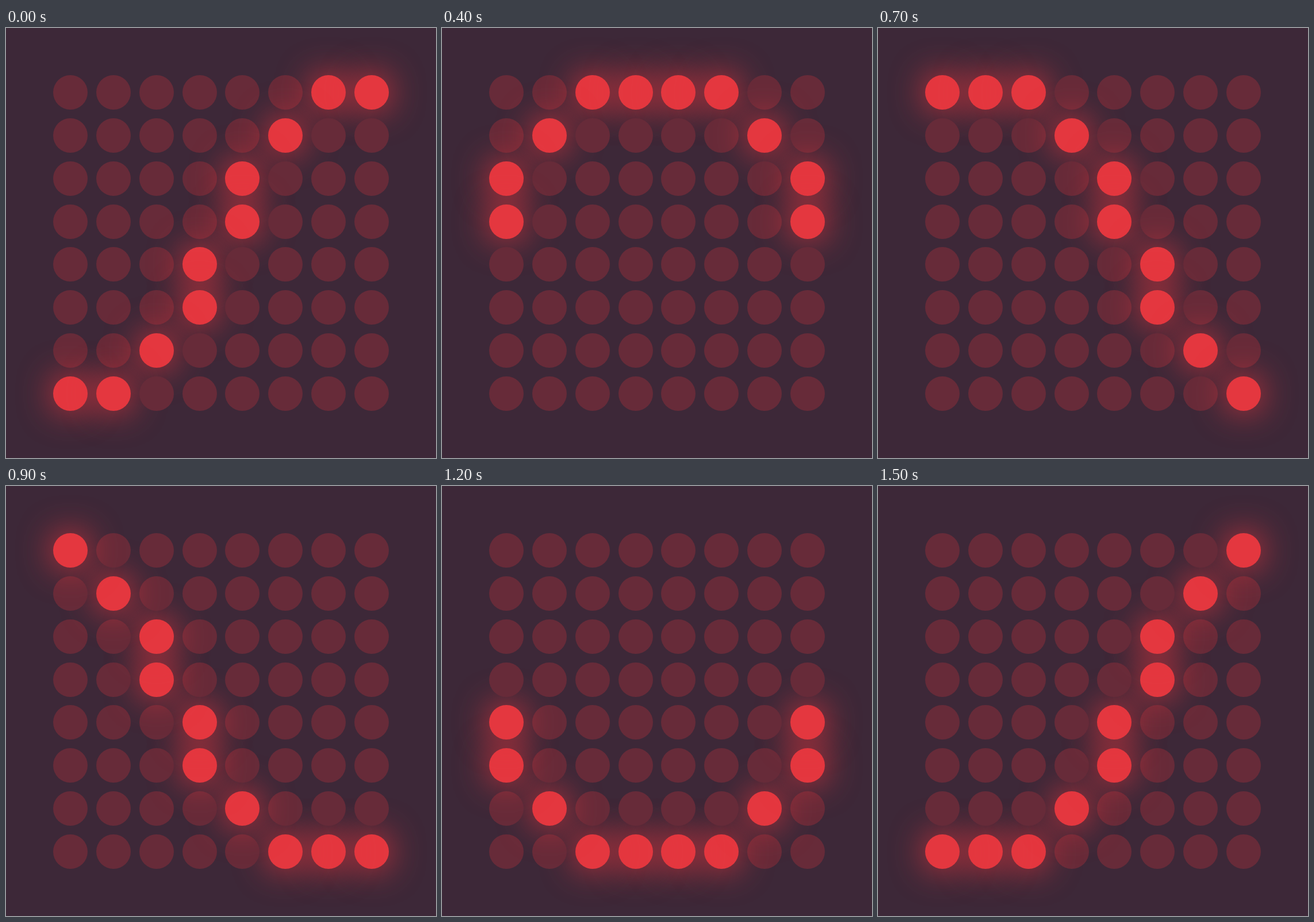
Write an HTML page that moves like this. It is 748x748 px and loops after 1.6 s.

```html
<!DOCTYPE html>
<html lang="en">
<head>
<meta charset="utf-8">
<title>Dot wave</title>
<style>
  :root { --bg: #3d2838; --dim: #672b39; --lit: #e4373f; }
  html, body { margin: 0; width: 100%; height: 100%; overflow: hidden; background: var(--bg); }
  #grid { position: relative; width: 748px; height: 748px; isolation: isolate; --dir: 1; }
  .dot {
    position: absolute;
    left: calc(82.28px + 74.8px * var(--col));
    top: calc(82.28px + 74.8px * var(--row));
    width: 59.84px;
    height: 59.84px;
    border-radius: 50%;
    background: var(--dim);
    z-index: calc((8 * var(--row) + var(--col)) * var(--dir));
  }
  .dot.lit { background: var(--lit); box-shadow: 0 0 60px var(--lit); }
</style>
</head>
<body>
<div id="grid"></div>
<script>
  const SIZE = 8, STEPS = 16, STEP_MS = 100;
  // Lit rows by distance from the crest of the wave
  const ROWS = [[0], [0], [1], [2, 3], [4, 5], [6], [7], [7]];
  const grid = document.getElementById('grid');
  const dots = [];

  for (let row = 0; row < SIZE; row++) {
    for (let col = 0; col < SIZE; col++) {
      const el = document.createElement('div');
      el.className = 'dot';
      el.style.setProperty('--row', row);
      el.style.setProperty('--col', col);
      grid.append(el);
      dots.push({ el, row, col });
    }
  }

  function litRows(phase) {
    const u = phase % STEPS;
    return ROWS[u < 8 ? 7 - u : u - 8];
  }

  function draw(step) {
    // The second half of the cycle stacks the dots in reverse
    grid.style.setProperty('--dir', step < STEPS / 2 ? 1 : -1);
    for (const { el, row, col } of dots) {
      el.classList.toggle('lit', litRows(col + step).includes(row));
    }
  }

  let shown = 0;
  const start = performance.now();
  function tick() {
    const step = Math.floor((performance.now() - start) / STEP_MS) % STEPS;
    if (step !== shown) draw(shown = step);
    requestAnimationFrame(tick);
  }
  draw(0);
  requestAnimationFrame(tick);
</script>
</body>
</html>
```
